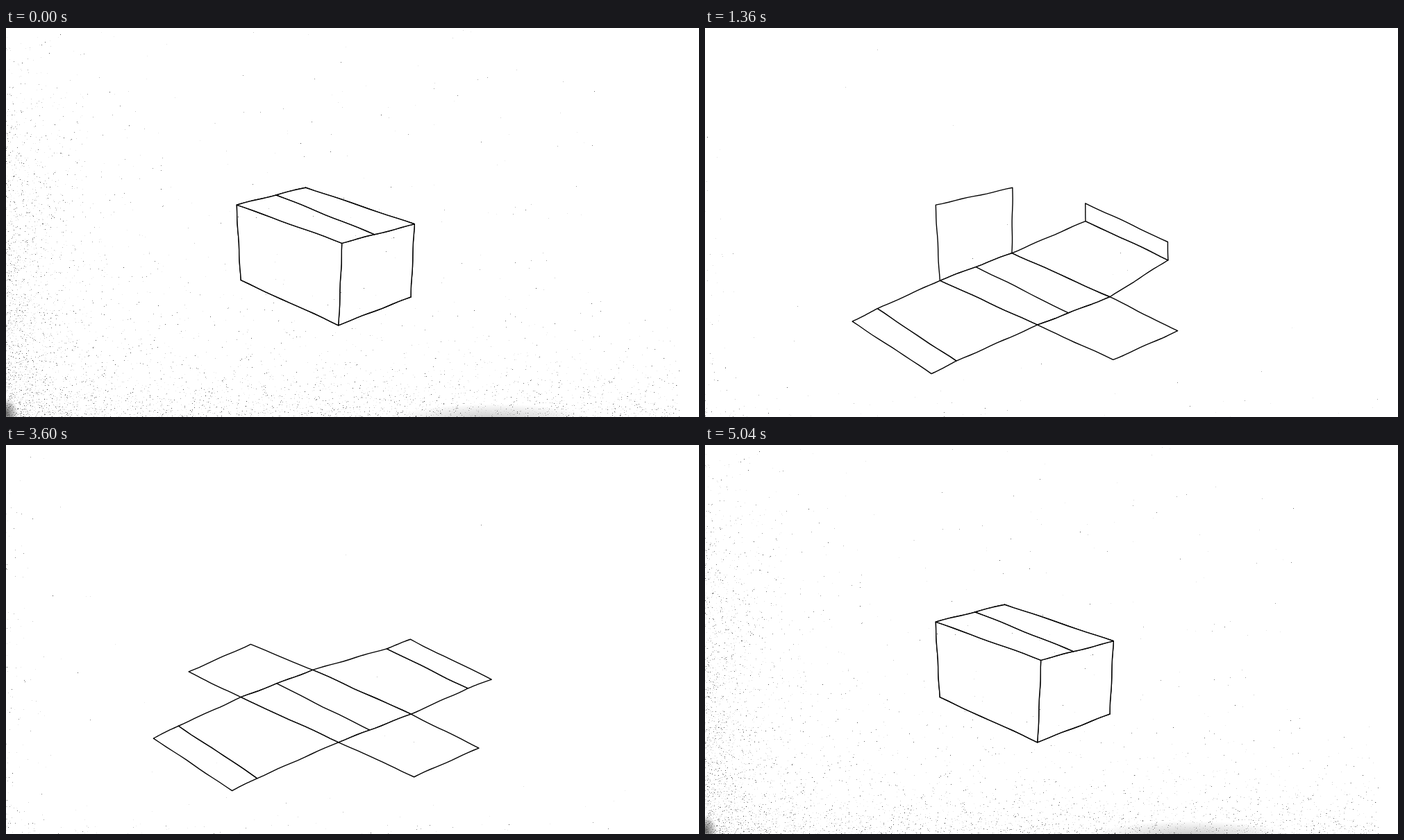
An HTML page with a canvas for the animation above (5320 ms loop, 998 by 561 pixels).

```html
<!DOCTYPE html>
<html lang="en">
<head>
<meta charset="utf-8">
<title>Unfolding box</title>
<style>
  html, body { margin: 0; width: 100%; height: 100%; overflow: hidden; background: #fff; }
  canvas { display: block; }
</style>
</head>
<body>
<canvas id="stage" width="998" height="561"></canvas>
<script>
const W = 998, H = 561, LOOP = 5320;
const ctx = document.getElementById('stage').getContext('2d');

// Floor corners and the screen vectors of the upright edges above them.
const A = [338, 364], B = [479, 428.5], C = [583, 388], D = [442, 324.5];
const UP_A = [-6, -109], UP_B = [5, -118.5], UP_C = [5, -105], UP_D = [-10, -94.5];

const add = (p, q) => [p[0] + q[0], p[1] + q[1]];
const sub = (p, q) => [p[0] - q[0], p[1] - q[1]];
const scale = (p, k) => [p[0] * k, p[1] * k];
const mix = (p, q, k) => add(scale(p, 1 - k), scale(q, k));

const progress = (t, from, to) => Math.min(1, Math.max(0, (t - from) / (to - from)));
const hump = (t, from, to) => Math.sin(Math.PI * progress(t, from, to));
function ease(t, from, to) {
  const u = progress(t, from, to);
  return u * u * (3 - 2 * u);
}

// A vector turned from upright (0) to lying outwards (1), or inwards (-1).
function swing(up, out, turn, inward = scale(out, -1)) {
  const a = turn * Math.PI / 2, s = Math.sin(a);
  return add(scale(up, Math.cos(a)), s < 0 ? scale(inward, -s) : scale(out, s));
}

// Top corner of a panel; it bulges a little halfway, as in perspective.
function corner(foot, up, out, turn) {
  return add(foot, scale(swing(up, out, turn), 1 + .1 * Math.sin(Math.PI * turn)));
}

function random(seed) {
  return () => {
    seed = seed + 0x6D2B79F5 | 0;
    let n = Math.imul(seed ^ seed >>> 15, 1 | seed);
    n = n + Math.imul(n ^ n >>> 7, 61 | n) ^ n;
    return ((n ^ n >>> 14) >>> 0) / 4294967296;
  };
}

let shake = 0, tilt = 0;

// Rocks a point about the right floor corner and adds the unsteady hand.
function place(p) {
  const [x, y] = sub(p, C), c = Math.cos(tilt), s = Math.sin(tilt);
  return [
    C[0] + x * c - y * s + .35 * Math.sin(x * .06 + y * .11 + shake),
    C[1] + x * s + y * c + .4 * Math.sin(x * .09 - y * .05 + shake * 1.7)
  ];
}

function trace(points) {
  ctx.beginPath();
  for (let i = 0; i + 1 < points.length; i++)
    for (let k = 0; k <= 12; k++) ctx.lineTo(...place(mix(points[i], points[i + 1], k / 12)));
}

function face(...points) {
  trace([...points, points[0]]);
  ctx.fill();
  ctx.stroke();
}

function drawBox(t) {
  const close = ease(t, 3620, 4100);
  const flapClose = 2 * ease(t, 3680, 4440);
  const front = ease(t, 200, 624) - close;
  const back = ease(t, 720, 1510) - close;
  const right = ease(t, 640, 960) - close;
  const left = progress(t, 2320, 2440) ** 2 - .1 * hump(t, 2440, 2560) - close;
  const frontFlap = 2 * ease(t, 120, 840) - 1 - flapClose;
  const backFlap = ease(t, 320, 940) + ease(t, 1360, 1640) - 1 - flapClose;
  tilt = .084 * hump(t, 4360, 4600);

  const f1 = corner(A, UP_A, [-90, 41], front), f2 = corner(B, UP_B, [-117, 52], front);
  const b1 = corner(D, UP_D, [106, -31], back), b2 = corner(C, UP_C, [82, -37], back);
  const r1 = corner(B, UP_B, [109, 50], right), r2 = corner(C, UP_C, [98, 49], right);
  const farUp = mix(UP_D, [1, -94], front);
  const l1 = corner(A, UP_A, [-75, -37], left), l2 = corner(D, farUp, [-90, -37], left);

  const flapUp = [-1, -26];
  const lid1 = sub(add(D, UP_D), add(A, UP_A)), lid2 = sub(add(C, UP_C), add(B, UP_B));
  const flap = (edge, out, turn, inward) => add(edge, swing(flapUp, out, turn, inward));
  const f3 = flap(f1, [-36, 18], frontFlap, scale(lid1, .57));
  const f4 = flap(f2, [-36, 18], frontFlap, scale(lid2, .45));
  const b3 = flap(b1, [34, -13], backFlap, scale(lid1, -.43));
  const b4 = flap(b2, [34, -13], backFlap, scale(lid2, -.55));

  face(A, D, l2, l1);
  face(D, C, b2, b1);
  face(A, B, C, D);
  trace([mix(A, D, .5), mix(B, C, .43)]);
  ctx.stroke();
  face(B, C, r2, r1);
  face(A, B, f2, f1);
  face(b1, b2, b4, b3);
  face(f1, f2, f4, f3);
}

// Flies straight at the upright panel, then on over it in an arc.
function drawBall(t) {
  if (t < 2000 || t > 2720) return;
  const hit = 2320, n = (t - hit) / 40, before = n < 0;
  const x = 398 - (before ? 47 : 44) * n;
  const y = 278 + (before ? 36 * n : 2.2 * n * n - 14 * n);
  const angle = before ? -.58 : Math.atan2(4.4 * n - 14, -44);
  ctx.beginPath();
  ctx.ellipse(x, y, before ? 16.5 : 14, before ? 9.5 : 11, angle, 0, 7);
  ctx.fill();
  ctx.stroke();
}

function shade(x, y, rx, ry, alpha) {
  ctx.save();
  ctx.translate(x, y);
  ctx.scale(rx, ry);
  const g = ctx.createRadialGradient(0, 0, 0, 0, 0, 1);
  g.addColorStop(0, `rgba(40,40,40,${alpha})`);
  g.addColorStop(1, 'rgba(40,40,40,0)');
  ctx.fillStyle = g;
  ctx.fillRect(-1, -1, 2, 2);
  ctx.restore();
}

// Scanner grain gathers at the left and bottom edges.
function drawGrain(t) {
  const dense = t === 0, rnd = random(t + 7);
  const count = dense ? 5200 : 60 + 160 * rnd();
  const wide = dense ? 50 : 22, high = dense ? 36 : 20;
  const fall = size => -Math.log(1 - rnd()) * size;
  for (let i = 0; i < count; i++) {
    const kind = rnd();
    let x, y;
    if (kind < .4) { x = fall(wide); y = H * rnd() ** .5; }
    else if (kind < .92) { x = 970 * rnd() ** (dense ? 1.1 : 2.5); y = H - fall(high); }
    else { x = 850 * rnd() ** 1.6; y = H * rnd() ** .7; }
    ctx.fillStyle = `rgba(0,0,0,${.08 + .65 * rnd() ** 3})`;
    ctx.fillRect(x | 0, y | 0, 1, 1);
  }
  if (dense) {
    shade(0, 556, 18, 22, .7);
    shade(700, 564, 140, 22, .25);
  }
}

function draw(t) {
  ctx.fillStyle = '#fff';
  ctx.fillRect(0, 0, W, H);
  ctx.strokeStyle = '#000';
  ctx.lineWidth = 1.4;
  ctx.lineJoin = ctx.lineCap = 'round';
  shake = t * .037;
  drawBox(t);
  drawBall(t);
  drawGrain(t);
}

// Drawn on 80 ms steps, on 40 ms steps while the ball flies, with two holds.
function stepTime(t) {
  if (t >= 5040) return 0;
  if (t >= 2800 && t < 3600) return 2800;
  const step = t >= 2000 && t < 2800 ? 40 : 80;
  return Math.floor(t / step) * step;
}

let shown = -1;
function tick() {
  const t = stepTime(performance.now() % LOOP);
  if (t !== shown) draw(shown = t);
  requestAnimationFrame(tick);
}
tick();
</script>
</body>
</html>
```
